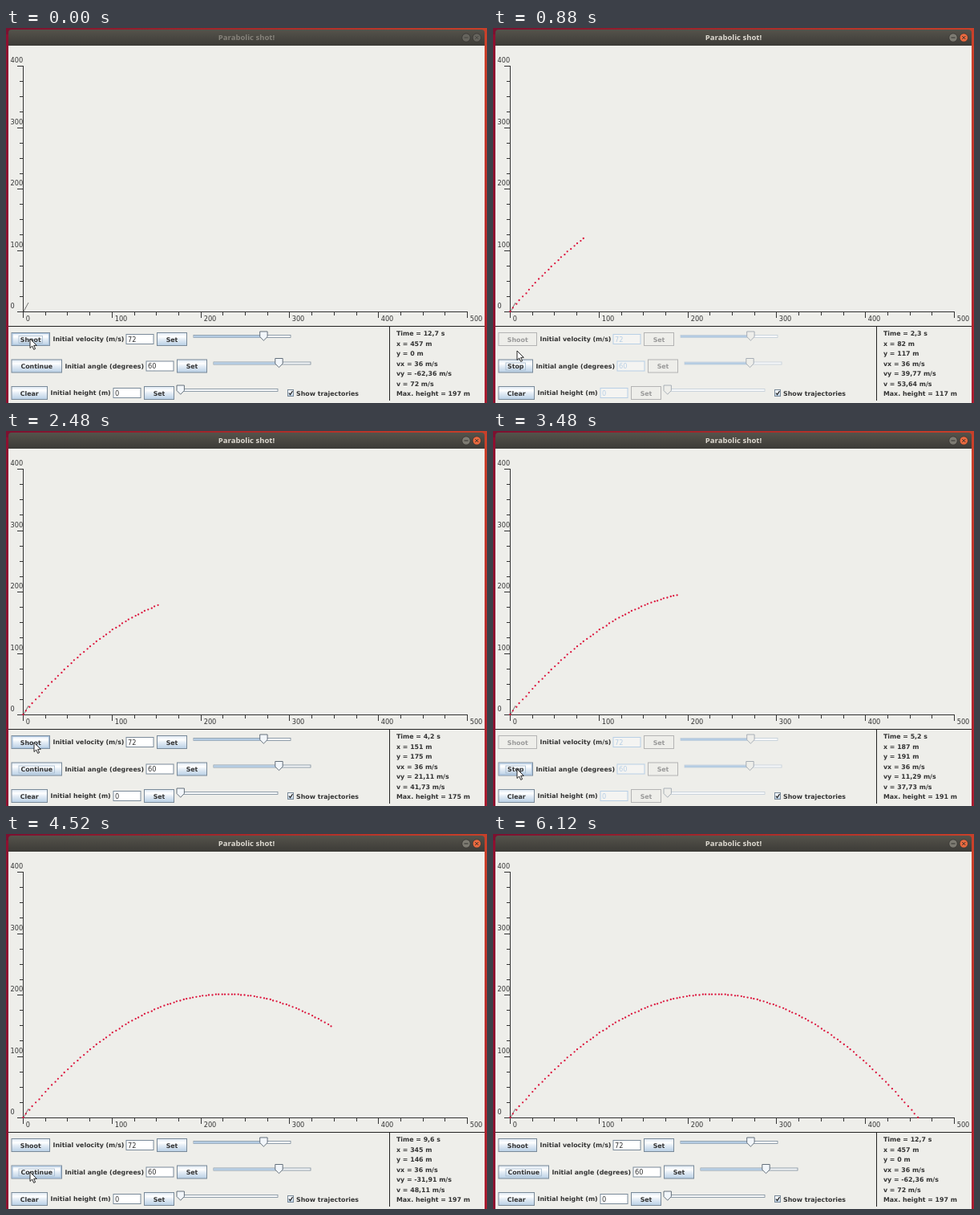
Recreate the animation shown at these times as an HTML page. Size 600 px wide and 467 px high, loop 8 s.

```html
<!DOCTYPE html>
<html lang="en">
<head>
<meta charset="utf-8">
<title>Parabolic shot!</title>
<style>
  html, body { margin: 0; width: 100%; height: 100%; overflow: hidden; }
  svg { display: block; width: 600px; height: 467px; }
  text { font: 8.2px "DejaVu Sans", sans-serif; fill: #333; white-space: pre; }
  .bold { font-weight: bold; font-size: 7.86px; }
  .title { font: bold 9.5px "Open Sans", sans-serif; text-anchor: middle; }
  .mid { text-anchor: middle; }
  .off { fill: #999; }
  .pale { fill: #b8cfe5; }
</style>
</head>
<body>
<svg viewBox="0 0 600 467">
  <defs>
    <linearGradient id="desk"><stop stop-color="#7c1030"/><stop offset=".5" stop-color="#a82a2a"/><stop offset="1" stop-color="#c8402a"/></linearGradient>
    <linearGradient id="edge" x2="0" y2="1"><stop stop-color="#cc422a"/><stop offset="1" stop-color="#a81c30"/></linearGradient>
    <linearGradient id="bar" x2="0" y2="1"><stop stop-color="#55534b"/><stop offset="1" stop-color="#3c3b37"/></linearGradient>
    <linearGradient id="face" x2="0" y2="1"><stop stop-color="#dde8f3"/><stop offset=".3" stop-color="#fff"/><stop offset=".5" stop-color="#e6eef6"/><stop offset="1" stop-color="#b8cfe5"/></linearGradient>
  </defs>
  <rect width="600" height="467" fill="#8e1030"/>
  <rect x="590" width="10" height="467" fill="url(#edge)"/>
  <rect width="600" height="8" fill="url(#desk)"/>
  <rect x="3" y="22" width="594" height="445" fill="#eeeeea"/>
  <path d="M3 22V6q0-4 4-4H593q4 0 4 4V22z" fill="url(#bar)"/>
  <g id="titleBar"></g>
  <g id="axes"></g>
  <g id="dots" fill="#dc143c"></g>
  <g id="panel"></g>
  <g id="readout"></g>
  <path id="cursor" d="M0 0V11.5L2.7 9L4.7 13.4L6.6 12.5L4.7 8.3H8.3z" fill="#fff" stroke="#111" stroke-width=".9"/>
</svg>
<script>
const LOOP = 8000, FPS = 15, LAST = 127;
const V = 72, VX = 36, VY = V * Math.sin(Math.PI / 3), G = 9.8196;
const BORDER = '#7a8a99';
const $ = id => document.getElementById(id);

// Each run: first frame, frame at which it ends, clock offset, tenths of a second at both ends.
const runs = [
  { from: 4, to: 20, zero: 4.5, start: 0, end: 42 },
  { from: 48, to: 68, zero: 48.4, start: 42, end: 96 },
  { from: 77, to: 89, zero: 77.7, start: 96, end: LAST }
];

// Cursor moves: frames, end points, sideways pull of the curve.
const moves = [
  { from: 10, to: 16, a: [30, 387], b: [30, 417], bend: 0 },
  { from: 25, to: 33, a: [30, 417], b: [35, 388], bend: 56 },
  { from: 37, to: 42, a: [35, 388], b: [30, 421], bend: 54 },
  { from: 89, to: 91, a: [30, 421], b: [555, 52], bend: 0 }
];

const height = s => VY * s - G * s * s / 2;
const metres = v => Math.max(0, Math.floor(v + 1e-6));
const clamp = (v, lo, hi) => Math.max(lo, Math.min(hi, v));
const text = (x, y, str, cls = '') => `<text x="${x}" y="${y}" class="${cls}">${str}</text>`;
const line = (x1, y1, x2, y2, color = '#333', w = 1) =>
  `<path d="M${x1} ${y1}L${x2} ${y2}" stroke="${color}" stroke-width="${w}"/>`;
const box = (x, y, w, h, fill, stroke, sw = 1) =>
  `<rect x="${x + .5}" y="${y + .5}" width="${w - 1}" height="${h - 1}" fill="${fill}" stroke="${stroke}" stroke-width="${sw}"/>`;

function drawAxes() {
  let out = line(14, 353.5, 576, 353.5) + line(21.5, 47, 21.5, 361);
  for (let i = 0; i <= 16; i++) {
    const y = Math.round(353 - i * 19.125) + .5, major = i % 4 === 0;
    out += line(major ? 14 : 17, y, 21, y);
    if (major) out += text(5.5, y - 4.3, i * 25);
  }
  for (let i = 0; i <= 20; i++) {
    const x = Math.round(21 + i * 27.7) + .5, major = i % 4 === 0;
    out += line(x, 353, x, major ? 361 : 358);
    if (major) out += text(x + 3.2, 365, i * 25);
  }
  out += line(22, 353, 28, 342, '#555', .8);
  out += line(3, 371.5, 597, 371.5, '#222') + line(478.5, 372, 478.5, 464, '#222');
  $('axes').innerHTML = out;
}

// Dots sit on whole metres, which gives the trail its uneven spacing.
function drawDots() {
  let out = '';
  for (let n = 0; n <= LAST; n++) {
    const x = 21.5 + metres(VX * n / 10) * 1.113, y = 353 - metres(height(n / 10)) * .778;
    out += `<circle cx="${x.toFixed(1)}" cy="${y.toFixed(1)}" r="1.15"/>`;
  }
  $('dots').innerHTML = out;
}

function drawTitle(active) {
  const mark = active ? '#33322e' : '#45443f';
  const round = (x, fill) => `<circle cx="${x}" cy="12" r="5.2" fill="${fill}" stroke="#33322e" stroke-width=".7"/>`;
  $('titleBar').innerHTML =
    `<text x="300" y="15.3" class="title" style="fill:${active ? '#dfdbd2' : '#85827a'}">Parabolic shot!</text>` +
    round(574, active ? '#7d7b72' : '#66645d') + line(571.5, 12, 576.5, 12, mark) +
    round(587.3, active ? '#ec6a3f' : '#66645d') +
    line(585.3, 10, 589.3, 14, mark) + line(589.3, 10, 585.3, 14, mark);
}

function button(x, y, w, label, { enabled = true, focus = false, tip = null } = {}) {
  const mid = x + w / 2;
  if (!enabled) return box(x, y, w, 17, '#eeeeea', '#b4b4b4') + text(mid, y + 11.6, label, 'bold mid off');
  const hover = tip && tip[0] >= x && tip[0] < x + w && tip[1] >= y && tip[1] < y + 17;
  let out = box(x, y, w, 17, 'url(#face)', BORDER);
  if (hover) out += box(x + 1, y + 1, w - 2, 15, 'none', '#a9c2dc', 1.2);
  if (focus) out += box(x + 9, y + 4, w - 18, 10, 'none', '#a3b8cc', .8);
  return out + text(mid, y + 11.6, label, 'bold mid');
}

function field(x, y, value, enabled) {
  return box(x - .5, y, 35, 13, enabled ? '#fff' : '#f4f4f2', enabled ? BORDER : '#b8cfe5') +
    text(x + 2, y + 9.6, value, enabled ? '' : 'pale');
}

function slider(x, y, w, thumb, enabled) {
  const edge = enabled ? BORDER : '#c3ced8';
  return box(x, y, w, 4, '#f6f8fa', edge, .8) +
    `<rect x="${x + .5}" y="${y + .8}" width="${thumb - x}" height="2.6" fill="#b4cbe2"/>` +
    `<path d="M${thumb - 4.7} ${y - 4}h9.4v6.5l-4.7 4.7l-4.7-4.7z" fill="${enabled ? '#f2f6fa' : '#eeeeea'}" stroke="${enabled ? '#56636f' : '#a0a8b0'}" stroke-width=".9"/>`;
}

function drawPanel(running, focusShoot, tip) {
  const on = !running, dx = running ? -20 : 0, mid = 412.5;
  const row = (y, labelX, label, fieldX, value, trackX, trackW, thumb) =>
    text(labelX, y + 11.4, label, 'bold') + field(fieldX, y + 2, value, on) +
    button(fieldX + 38, y, 38, 'Set', { enabled: on }) + slider(trackX, y + 3, trackW, thumb, on);
  $('panel').innerHTML =
    button(6.5, 379, 48.5, 'Shoot', { enabled: on, focus: focusShoot, tip }) +
    row(379, 58.6, 'Initial velocity (m/s)', 150, 72, 233.5, 122, 321.4) +
    button(6.5, mid, 63.5 + dx, running ? 'Stop' : 'Continue', { focus: !focusShoot, tip }) +
    row(mid, 73.4 + dx, 'Initial angle (degrees)', 175 + dx, 60, 258.5 + dx, 122, 340.5 + dx) +
    button(6.5, 446, 45.5, 'Clear') +
    row(446, 55.6, 'Initial height (m)', 134, 0, 214.5, 125, 217.7) +
    box(351, 450, 8, 9, 'url(#face)', BORDER) +
    '<path d="M353 454.5l1.5 2.2l3-4.5" fill="none" stroke="#222" stroke-width="1.2"/>' +
    text(362, 457.5, 'Show trajectories', 'bold');
}

function drawReadout(n) {
  const s = n / 10, vy = VY - G * s;
  const num = v => String(parseFloat(v.toFixed(2))).replace('.', ',');
  const peak = height(Math.min(s, VY / G));
  $('readout').innerHTML = [
    `Time = ${num(s)} s`,
    `x = ${metres(VX * s)} m`,
    `y = ${metres(height(s))} m`,
    `vx = ${VX} m/s`,
    `vy = ${num(vy)} m/s`,
    `v = ${num(Math.hypot(VX, vy))} m/s`,
    `Max. height = ${metres(peak)} m`
  ].map((str, i) => text(487, 383.2 + i * 12.5, str, 'bold')).join('');
}

function tenthsAt(k) {
  const run = runs.filter(r => k >= r.from).pop();
  if (!run) return LAST;
  if (k >= run.to) return run.end;
  return clamp(run.start + Math.floor((k - run.zero) * 2.8), run.start, run.end);
}

function cursorAt(k) {
  const m = moves.filter(m => k >= m.from).pop() || moves[0];
  const p = clamp((k - m.from) / (m.to - m.from), 0, 1);
  const side = 2 * p * (1 - p) * m.bend;
  return [m.a[0] + (m.b[0] - m.a[0]) * p + side, m.a[1] + (m.b[1] - m.a[1]) * p];
}

function drawFrame(k) {
  const fired = k >= runs[0].from, n = tenthsAt(k), tip = cursorAt(k);
  drawTitle(fired);
  [...$('dots').children].forEach((dot, i) => dot.style.display = fired && i <= n ? '' : 'none');
  drawPanel(runs.some(r => k >= r.from && k < r.to), !fired, tip);
  drawReadout(n);
  $('cursor').setAttribute('transform', `translate(${tip})`);
  $('cursor').style.display = k < 92 ? '' : 'none';
}

let shown = -1;
function tick() {
  const t = performance.now() % LOOP;
  const k = Math.floor((t + 20) * FPS / 1000);
  if (k !== shown) drawFrame(shown = k);
  requestAnimationFrame(tick);
}

drawAxes();
drawDots();
tick();
</script>
</body>
</html>
```
